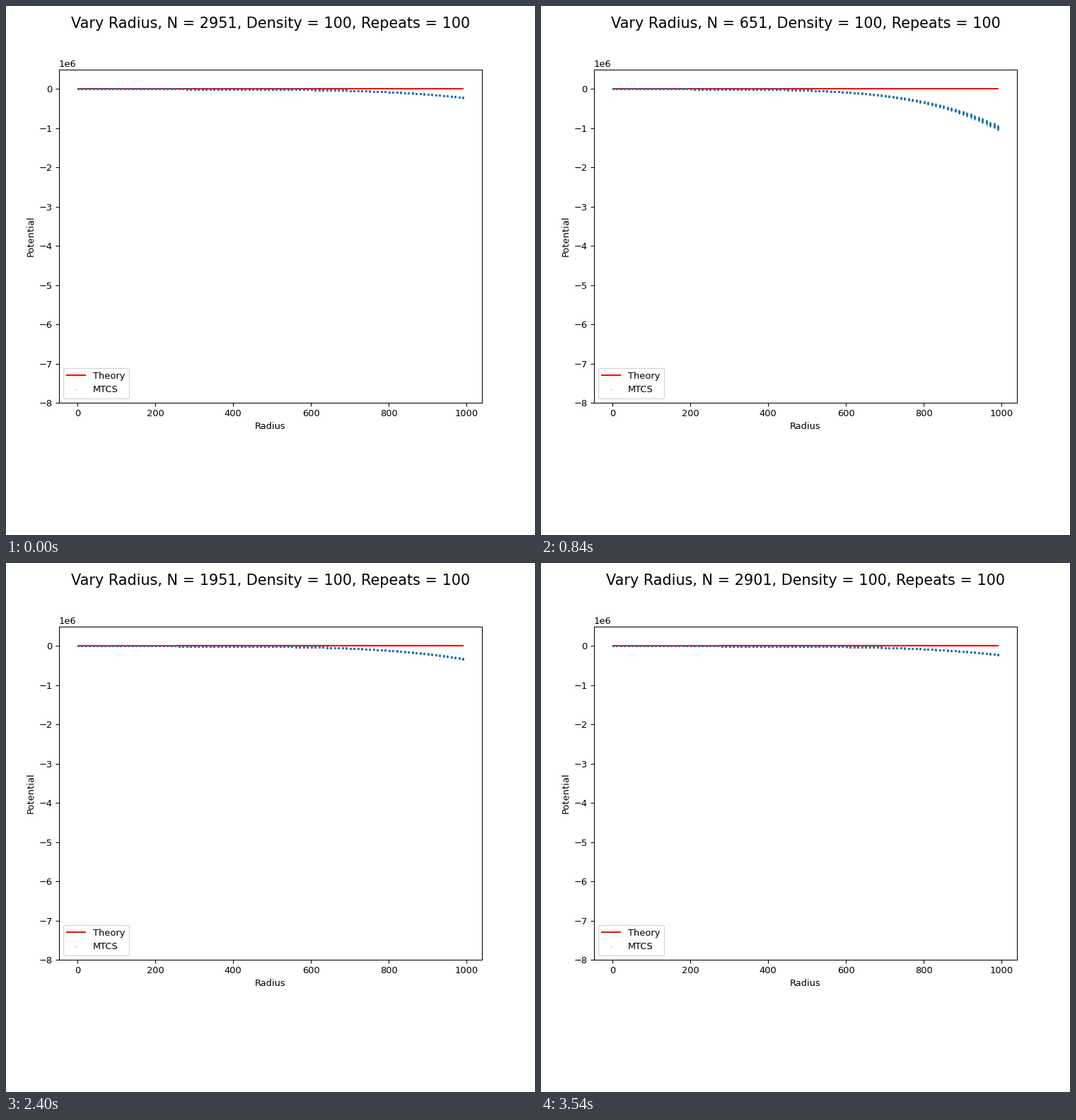
A matplotlib script for the animation above (3.6 s loop, 748 by 748 pixels).

```python
import numpy as np
import matplotlib.pyplot as plt
from matplotlib.animation import FuncAnimation

SIZE, INCHES = 748, 8
FRAMES, INTERVAL = 60, 60
G, DENSITY, REPEATS = 6.674e-11, 100, 100
RADII = np.arange(1, 1000, 10)
SHAPE = (REPEATS, len(RADII))
NEAR = 0.1


def particle_count(i):
    return 50 * ((i - 1) % FRAMES) + 1


def mean_inverse_distance(n, rng):
    """Mean of 1/d from a surface point to n points in a unit ball."""
    if n < 200:
        return sum(0.5 / rng.beta(3, 2, SHAPE) for _ in range(n)) / n
    # Far points sum to a normal value; rare near ones are added one by one.
    mean = 1 - 0.75 * NEAR**2
    var = 1.5 * (1 - NEAR) - mean**2
    total = rng.normal(n * mean, np.sqrt(n * var), SHAPE)
    hits = rng.poisson(total.size * n * NEAR**3 / 2)
    cells = rng.integers(total.size, size=hits)
    dist = NEAR * np.cbrt(1 - rng.random(hits))
    np.add.at(total.reshape(-1), cells, 1 / dist)
    return total / n


def potential(n, rng):
    scale = G * DENSITY**2 * RADII.astype(float)**5 / n
    return -scale * mean_inverse_distance(n, rng)


fig, ax = plt.subplots(figsize=(INCHES, INCHES), dpi=SIZE / INCHES)
fig.subplots_adjust(left=0.1, right=0.9, bottom=0.25, top=0.88)
title = fig.suptitle("", fontsize=16)

ax.plot(RADII, np.zeros(len(RADII)), color="red", label="Theory")
# Faint dots that build up to solid colour where they overlap.
dots, = ax.plot([], [], "o", color="tab:blue", markersize=1.45,
                markeredgewidth=0, alpha=0.45, label="MTCS")
ax.set_xlim(-48.5, 1040.5)
ax.set_ylim(-8e6, 0.5e6)
ax.set_xlabel("Radius")
ax.set_ylabel("Potential")
ax.legend(loc="lower left")

grid = np.tile(RADII, REPEATS)


def update(i):
    n = particle_count(i)
    rng = np.random.default_rng(i + 100)
    dots.set_data(grid, potential(n, rng).ravel())
    title.set_text(f"Vary Radius, N = {n}, Density = {DENSITY}, "
                   f"Repeats = {REPEATS}")
    return dots, title


anim = FuncAnimation(fig, update, frames=FRAMES, interval=INTERVAL,
                     repeat=True, repeat_delay=0, blit=False)
plt.show()
```
